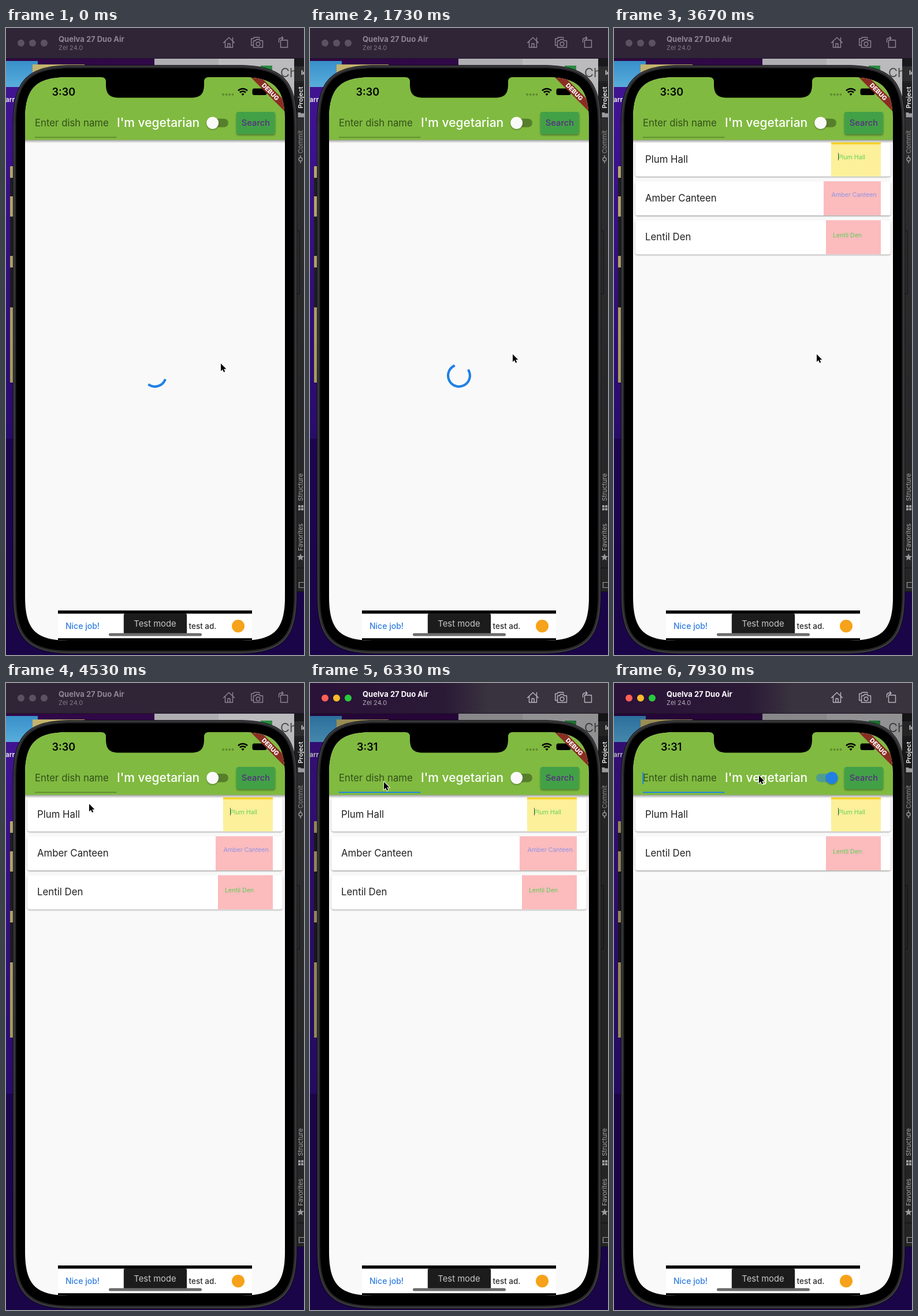
Animation, 516 px wide and 1084 px high, one loop 8000 ms. Source, as an HTML page:

```html
<!DOCTYPE html>
<html lang="en">
<head>
<meta charset="utf-8">
<title>Dish search</title>
<style>
  html, body { margin: 0; width: 100%; height: 100%; overflow: hidden; background: #000; }
  svg { display: block; width: 100%; height: 100%; }
  text { font-family: Inter, Roboto, sans-serif; white-space: pre; }
  .m { font-weight: 500; }
  .b { font-weight: 700; }
  .line { fill: none; stroke-width: 1.4; stroke-linejoin: round; stroke-linecap: round; }
</style>
</head>
<body>
<svg viewBox="0 0 516 1084" xmlns="http://www.w3.org/2000/svg">
  <defs>
    <linearGradient id="wall" x1="0" y1="0" x2="0" y2="1">
      <stop offset="0" stop-color="#4c17a8"/><stop offset=".6" stop-color="#35108c"/>
      <stop offset="1" stop-color="#2a0a72"/>
    </linearGradient>
    <linearGradient id="sky" x1="0" y1="0" x2="0" y2="1">
      <stop offset="0" stop-color="#3f9fe0"/><stop offset="1" stop-color="#63c3f6"/>
    </linearGradient>
    <linearGradient id="barOn">
      <stop offset="0" stop-color="#2b1238"/><stop offset=".45" stop-color="#2a1a36"/>
      <stop offset=".6" stop-color="#39333f"/><stop offset="1" stop-color="#38333d"/>
    </linearGradient>
    <linearGradient id="fade" x1="0" y1="0" x2="0" y2="1">
      <stop offset="0" stop-opacity=".38"/><stop offset="1" stop-opacity="0"/>
    </linearGradient>
    <linearGradient id="shade" x1="0" y1="0" x2="0" y2="1">
      <stop offset="0" stop-opacity=".1"/><stop offset="1" stop-opacity=".3"/>
    </linearGradient>
    <filter id="soft" x="-20%" y="-30%" width="140%" height="170%">
      <feDropShadow dx="0" dy="1.3" stdDeviation="1.1" flood-opacity=".38"/>
    </filter>
    <filter id="lift" x="-30%" y="-40%" width="160%" height="190%">
      <feDropShadow dx="0" dy="2" stdDeviation="1.8" flood-opacity=".4"/>
    </filter>
    <clipPath id="screen"><path id="glass"/></clipPath>
  </defs>

  <!-- desktop -->
  <rect width="516" height="1084" fill="url(#wall)"/>
  <rect y="710" width="516" height="374" fill="#240766"/>
  <rect y="53" width="257" height="12" fill="#35094f"/>
  <rect y="57" width="55" height="45" fill="url(#sky)"/>
  <rect x="46" y="63" width="90" height="20" fill="#d9c878"/>
  <text class="b" x="-1" y="128" font-size="11.5" fill="#fff">arr</text>
  <rect x="7" y="239" width="8" height="374" fill="#232126"/>
  <path d="M7 239h8v20h-8zM7 291h8v35h-8zM7 394h8v20h-8zM7 483h8v130h-8z" fill="#cfc07a"/>
  <rect x="257" y="53" width="111" height="40" fill="#c3c1c6"/>
  <rect x="368" y="53" width="131" height="100" fill="#d0cfd2"/>
  <rect x="441" y="65" width="20" height="25" fill="#2f9a4a"/>
  <text x="475" y="85" font-size="22" fill="#555">Ch</text>
  <rect x="499" y="53" width="17" height="922" fill="#333335"/>
  <rect x="499" y="53" width="17" height="12" fill="#1d1b20"/>
  <path d="M499 65.500h17M499 92.500h17M504 350h4v110h-4M499 933.500h17M499 974.500h17" fill="none" stroke="#161618"/>
  <rect x="499" y="94" width="17" height="62" fill="#222224"/>
  <rect id="dim" y="53" width="516" height="1031"/>

  <!-- side panel -->
  <text class="b" x="511" y="81" font-size="11" fill="#ddd">Id</text>
  <g id="side" font-size="11"></g>
  <g fill="#9b9b9d">
    <path d="M505.500 146h4l1.500 1.500h5v7h-10.500zM506 825h4v4h-4zM511 825h4v4h-4zM506 830h4v4h-4zM511 830h4v4h-4z"/>
    <path d="M510 908.500l1.700 4.300 4.600.3-3.600 2.900 1.200 4.500-3.900-2.500-3.900 2.500 1.200-4.500-3.600-2.900 4.600-.3z"/>
    <path d="M510 220v4m0 6v4" stroke="#9b9b9d" stroke-width="1.400"/>
    <circle cx="510" cy="227" r="3" fill="none" stroke="#9b9b9d" stroke-width="1.400"/>
    <path d="M516 958.500h-8.500v9h8.500M507.500 961v-2" fill="none" stroke="#9b9b9d" stroke-width="1.200"/>
  </g>

  <!-- window bar -->
  <rect id="bar" width="516" height="53"/>
  <path d="M0 52.500h516" stroke="#1d1623"/>
  <g id="lights"><circle cx="26" cy="26" r="6"/><circle cx="46" cy="26" r="6"/><circle cx="66" cy="26" r="6"/></g>
  <text id="device" class="b" x="91" y="24" font-size="13">Quelva 27 Duo Air</text>
  <text id="system" x="91" y="38" font-size="11">Zel 24.0</text>
  <g id="tools" class="line">
    <path d="M376.500 25.500l9.500-9 9.500 9M379.500 23v10.500h13v-10.500M392.500 21.500v-5M384 33.500v-6.500h4v6.500"/>
    <path d="M428.500 22h3.500l1.500-2.300h5l1.500 2.300h4.500v11.500h-16zM428 30h-3.300v-11.500h3.500l1.500-2.300h8.500l1 1.500"/>
    <circle cx="436.500" cy="27.500" r="3.300"/>
    <path d="M475.500 21h12v12.500h-12zM472.500 24.500v-3.500q0-3.500 3.500-3.500h3.500M477.500 15l2.500 2.500-2.500 2.500"/>
  </g>

  <!-- phone -->
  <g id="shell"></g>
  <g clip-path="url(#screen)">
    <rect x="33" y="85" width="450" height="974" fill="#f9f9f9"/>
    <g id="list"></g>
    <path id="spin" fill="none" stroke="#2080e6" stroke-width="4.200" stroke-linecap="square"/>
    <rect x="33" y="193" width="450" height="6" fill="url(#fade)"/>
    <rect x="33" y="85" width="450" height="108.500" fill="#80ba40"/>
    <path d="M165 85h186q-8 0-8 8v4c0 17-6 23.500-23 23.500h-124c-17 0-23-6.500-23-23.500v-4q0-8-8-8z"/>
    <text id="clock" y="117" font-size="18" font-weight="600"></text>
    <g fill="#5f8c30">
      <circle cx="376" cy="115" r="2"/><circle cx="381.500" cy="115" r="2"/>
      <circle cx="387" cy="115" r="2"/><circle cx="392.500" cy="115" r="2"/>
    </g>
    <g fill="none" stroke="#000" stroke-width="2.500">
      <path d="M402 108.300a11.500 11.500 0 0 1 16 0M404.900 111.500a7.300 7.300 0 0 1 10.200 0"/>
      <path d="M410 117l-2.500-2.700a3.600 3.600 0 0 1 5 0z" fill="#000" stroke="none"/>
    </g>
    <rect x="426.500" y="104.500" width="25" height="11.500" rx="3.500"/>
    <g transform="translate(483 85) rotate(45)">
      <rect x="-60" y="29.400" width="120" height="12.600" fill="#8a2d24"/>
      <text x="0" y="39.500" text-anchor="middle" font-size="10.700" font-weight="800" fill="#fff">DEBUG</text>
    </g>

    <text x="50" y="170" font-size="16.800" fill="#33501a">Enter dish name</text>
    <rect id="rule" x="50" width="141.500"/>
    <rect id="caret" x="49.200" y="154" width="2.100" height="21" rx="1" fill="#2182dc"/>
    <text class="m" x="192" y="171" font-size="21" fill="#fff">I'm vegetarian</text>
    <rect id="track" x="350" y="156.700" width="35" height="14.700" rx="7.350"/>
    <circle id="thumb" cy="164" r="10.500" filter="url(#soft)"/>
    <rect x="399" y="145" width="67" height="38.500" rx="4" fill="#42a146" filter="url(#lift)"/>
    <text class="m" x="432.500" y="169" text-anchor="middle" font-size="14.700" fill="#54307c">Search</text>

    <!-- banner ad -->
    <rect x="90" y="1007" width="336" height="53"/>
    <rect x="90" y="1012.500" width="336" height="42.500" fill="#fff"/>
    <text class="m" x="103" y="1039" font-size="14" fill="#2f7de1">Nice job!</text>
    <text class="m" x="316.500" y="1039" font-size="13.500" fill="#2a2b2d">test ad.</text>
    <circle cx="402" cy="1034" r="11" fill="#f6a21a"/>
    <rect x="204" y="1012" width="109" height="36" rx="3" fill="#1b1c1f" filter="url(#soft)"/>
    <text x="258" y="1035" text-anchor="middle" font-size="14.800" fill="#c6c6c8">Test mode</text>
    <rect x="178" y="1046.300" width="161" height="5" rx="2.500" fill="#6c6c6e"/>
  </g>

  <path id="mouse" d="M0 0v13.200l3-2.900 2.100 4.800 2.200-1-2.100-4.700h4.200z" stroke="#fff" stroke-width="1.800" paint-order="stroke"/>
</svg>
<script>
const $ = id => document.getElementById(id);
const set = (el, attrs) => { for (const k in attrs) el.setAttribute(k, attrs[k]); };
const clamp = x => Math.min(1, Math.max(0, x));

const LOOP = 8000, STEP = 1000 / 15;
const LOADED = 3600, FOCUS = 5540, MINUTE = 6330, TOGGLE = 7200, FILTER = 7330;

// rectangle whose corners ease into the sides
function smoothRect(x, y, w, h, r) {
  const n = 1.36 * r, c = .328 * r, e = n - c;
  return `M${x + n} ${y}h${w - 2 * n}c${e} 0 ${n} ${c} ${n} ${n}v${h - 2 * n}` +
    `c0 ${e} ${-c} ${n} ${-n} ${n}h${2 * n - w}c${-e} 0 ${-n} ${-c} ${-n} ${-n}` +
    `v${2 * n - h}c0 ${-e} ${c} ${-n} ${n} ${-n}z`;
}
const shells = [[0, '#0f0f10'], [1, '#454547'], [2.5, '#29292b'], [5.5, '#000']];
$('shell').innerHTML = shells.map(([d, c]) =>
  `<path d="${smoothRect(12 + d, 64 + d, 492 - 2 * d, 1018 - 2 * d, 76 - d)}" fill="${c}"/>`).join('');
set($('glass'), { d: smoothRect(33, 85, 450, 974, 56) });

// vertical side labels: text, lower end, colour, weight
const labels = [['Project', 139, '#eee', 600], ['Commit', 217, '#8f8f91', 400],
  ['Structure', 818, '#a5a5a7', 400], ['Favorites', 904, '#a5a5a7', 400]];
$('side').innerHTML = labels.map(([s, y, c, w]) =>
  `<text transform="translate(514 ${y}) rotate(-90)" fill="${c}" font-weight="${w}">${s}</text>`).join('');

const places = [
  { name: 'Plum Hall', x: 376, paper: '#fdf09a', ink: '#5fd257', dx: 12, ty: 29 },
  { name: 'Amber Canteen', x: 363, paper: '#fcbbbd', ink: '#8b97e6', dx: 13.5, ty: 27 },
  { name: 'Lentil Den', x: 367, paper: '#fcbbbd', ink: '#5bcf55', dx: 12, ty: 30 }
];
$('list').innerHTML = places.map((p, i) => `<g class="card">
  <rect x="37" width="442" height="58.800" rx="4" fill="#fff" filter="url(#soft)"/>
  <text x="54" y="35" font-size="16.800" fill="#212121">${p.name}</text>
  <rect x="${p.x}" width="${462 - p.x}" height="58.800" fill="${p.paper}"/>
  ${i ? '' : '<path d="M376 0h86v3.500h-86z" fill="#f5d32a"/><path d="M388.500 18v13" stroke="#555"/>'}
  <text x="${p.x + p.dx}" y="${p.ty}" font-size="10.600" fill="${p.ink}">${p.name}</text></g>`).join('');
const cards = [...document.querySelectorAll('.card')];
const lights = [...$('lights').children];

// cubic-bezier(.4, 0, .2, 1)
function fastSlow(x) {
  let lo = 0, hi = 1;
  for (let i = 0; i < 24; i++) {
    const s = (lo + hi) / 2, r = 1 - s;
    if (1.2 * s * r * r + .6 * s * s * r + s * s * s < x) lo = s; else hi = s;
  }
  return lo * lo * (3 - 2 * lo);
}

function spinner(t) {
  const path = (t / 1333 + .148) % 1, turn = t / 2222 + .282;
  const head = fastSlow(clamp(path * 2)), tail = fastSlow(clamp(path * 2 - 1));
  const from = Math.PI * (-.5 + 1.5 * tail + 2 * turn + .5 * path);
  const sweep = Math.max(1.5 * Math.PI * (head - tail), .001);
  const at = a => `${258 + 18.9 * Math.cos(a)} ${601 + 18.9 * Math.sin(a)}`;
  return `M${at(from)}A18.9 18.9 0 ${sweep > Math.PI ? 1 : 0} 1 ${at(from + sweep)}`;
}

// pointer stops: arrive, leave, x, y
const stops = [[0, 60, 372, 580], [530, 3730, 351, 564], [4470, 4930, 144, 209],
  [5330, 6330, 128, 171], [7000, 7530, 365, 156], [7930, 8000, 251, 160]];
function pointer(t) {
  const i = stops.findIndex(s => t <= s[1] + 1);
  const b = stops[i], a = stops[i - 1] || b;
  if (t >= b[0]) return [b[2], b[3]];
  const p = (t - a[1]) / (b[0] - a[1]), e = p * p * (3 - 2 * p);
  return [a[2] + (b[2] - a[2]) * e, a[3] + (b[3] - a[3]) * e];
}

function caretAlpha(t) {
  const p = (t - FOCUS) % 1000, fade = clamp((p % 500) / 250);
  return t < FOCUS ? 0 : p < 500 ? (t - FOCUS < 500 ? 1 : fade) : 1 - fade;
}

function draw(t) {
  const on = t >= FOCUS;
  set($('bar'), { fill: on ? 'url(#barOn)' : '#2f2537' });
  lights.forEach((c, i) => set(c, { fill: on ? ['#fe5f57', '#febb2e', '#2ac840'][i] : '#5a5261' }));
  set($('device'), { fill: on ? '#fff' : '#8e8695' });
  set($('system'), { fill: on ? '#b3adb8' : '#80788a' });
  set($('tools'), { stroke: on ? '#b9b5bd' : '#8d8594' });
  set($('dim'), { fill: on ? 'rgba(0,0,0,.3)' : 'url(#shade)' });

  const late = t >= MINUTE;
  $('clock').textContent = late ? '3:31' : '3:30';
  set($('clock'), { x: late ? 81 : 79.5 });

  set($('rule'), on ? { y: 188, height: 2.1, fill: '#2389d8' } : { y: 188.5, height: 1, fill: '#486b22' });
  set($('caret'), { opacity: caretAlpha(t) });

  const flip = fastSlow(clamp((t - TOGGLE) / 200));
  set($('track'), { fill: flip > .5 ? '#509d90' : '#577f2b' });
  set($('thumb'), { cx: 357.7 + 19.5 * flip, fill: flip > .5 ? '#2180e2' : '#fafafa' });

  const loading = t < LOADED, filtered = t >= FILTER;
  set($('spin'), { d: spinner(t), visibility: loading ? 'visible' : 'hidden' });
  cards.forEach((c, i) => set(c, {
    visibility: loading || (filtered && i === 1) ? 'hidden' : 'visible',
    transform: `translate(0 ${197.8 + 67.3 * (filtered && i === 2 ? 1 : i)})`
  }));

  set($('mouse'), { transform: `translate(${pointer(t)})` });
}

const begin = performance.now();
function tick() {
  const t = (performance.now() - begin) % LOOP;
  // motion advances 15 times a second
  const step = Math.floor((Math.floor(t / 10) * 10 + 5) / STEP);
  draw(Math.min(step, 119) * STEP);
  requestAnimationFrame(tick);
}
draw(0);
tick();
</script>
</body>
</html>
```
